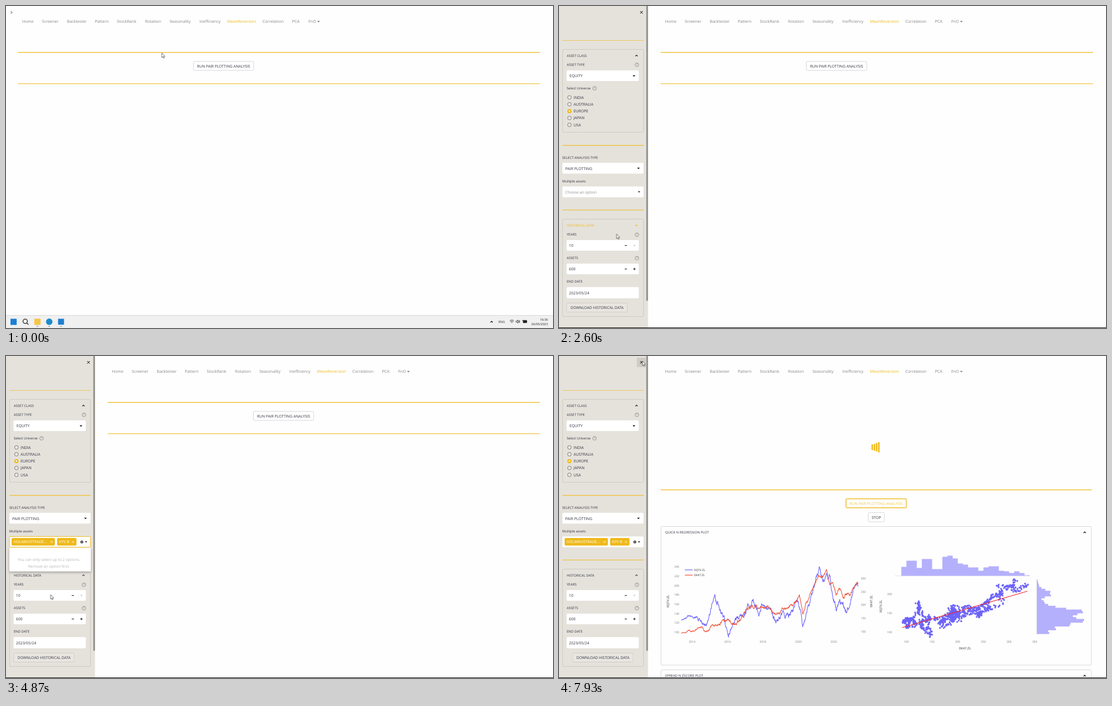
These frames come from a looping animation (974x575 px, 8000 ms). An HTML page:

```html
<!DOCTYPE html>
<html lang="en">
<head>
<meta charset="utf-8">
<title>Pair plotting</title>
<style>
html, body { margin: 0; width: 100%; height: 100%; overflow: hidden; background: #fefefe; }
svg { display: block; width: 100%; height: 100%; --gold: #eeb91b; --ink: #31333f; }
text { font-family: "Open Sans", "Noto Sans", sans-serif; font-size: 6.8px; fill: var(--ink);
  dominant-baseline: central; text-rendering: geometricPrecision; white-space: pre; }
.mid { text-anchor: middle; }
.end { text-anchor: end; }
.label { font-size: 6px; }
.nav text { font-size: 7.15px; fill: #858585; }
.nav .here, .gold { fill: var(--gold); }
.rule { fill: #efc02f; }
.tick text { font-size: 5.1px; fill: #777; }
.axis { font-size: 5.8px; font-weight: 600; fill: #666; }
.tray text { font-size: 5.6px; fill: #222; }
.field { fill: #fff; }
.box { fill: none; stroke: #cdcac4; }
.panel { fill: none; stroke: #d8d8db; }
.pen { fill: none; stroke: currentColor; }
.white { fill: #fff; }

.k, .glide { animation: 8s step-end infinite; }
.glide { animation-timing-function: ease-in-out; }
@keyframes closed { 0% { visibility: visible } 16.625%, to { visibility: hidden } }
@keyframes opener { 0% { visibility: hidden } 12.5% { visibility: visible } 16.625%, to { visibility: hidden } }
@keyframes shift { 0% { transform: translateX(0) } 16.625%, to { transform: translateX(160px) } }
@keyframes rule1 {
  0% { x: 21px; width: 930px; y: 82.2px }
  16.625% { x: 181px; width: 770px; y: 82.2px }
  88.375%, to { x: 181px; width: 767.5px; y: 238.3px }
}
@keyframes rule2 {
  0% { x: 21px; width: 930px; visibility: visible }
  16.625% { x: 181px; width: 770px; visibility: visible }
  88.375%, to { x: 181px; width: 770px; visibility: hidden }
}
@keyframes runPos {
  0% { transform: translate(387.5px, 107px) }
  16.625% { transform: translate(494.2px, 107px) }
  88.375%, to { transform: translate(564.7px, 263px) }
}
@keyframes runBox {
  0% { stroke: #d6d6d9; fill: #fff; stroke-width: 1px }
  81.875% { stroke: #eeb91b; fill: #fff; stroke-width: 1px }
  84.2% { stroke: #f2cd5e; fill: #eeb91b; stroke-width: 2px }
  86.7%, to { stroke: #f2cd5e; fill: #fff; stroke-width: 2px }
}
@keyframes runText {
  0% { fill: #31333f }
  81.875% { fill: #eeb91b }
  84.2% { fill: #fff }
  86.7%, to { fill: #f0c648 }
}
@keyframes stale {
  0%, 55%, 58.4%, 65%, 68.3%, to { opacity: 1 }
  57.5%, 67.5% { opacity: .85 }
}
@keyframes taskbar {
  0%, 1.6% { transform: translateY(0) }
  4.4%, to { transform: translateY(24px) }
}
@keyframes side {
  0%, 16.5% { transform: translateX(-158.5px); animation-timing-function: ease }
  20.25%, to { transform: translateX(0) }
}
@keyframes header {
  0% { color: #31333f } 31.2% { color: #eeb91b } 33% { color: #31333f }
  35.5% { color: #eeb91b } 36.4%, to { color: #31333f }
}
@keyframes focus { 0% { stroke: #0000 } 40% { stroke: #eeb91b } 74.125%, to { stroke: #0000 } }
@keyframes empty { 0% { visibility: visible } 49.125%, to { visibility: hidden } }
@keyframes one { 0% { visibility: hidden } 49.125%, to { visibility: visible } }
@keyframes two { 0% { visibility: hidden } 59.875%, to { visibility: visible } }
@keyframes listA { 0% { visibility: hidden } 41.625% { visibility: visible } 49.125%, to { visibility: hidden } }
@keyframes listB { 0% { visibility: hidden } 49.125% { visibility: visible } 59.875%, to { visibility: hidden } }
@keyframes list { 0% { visibility: hidden } 41.625% { visibility: visible } 59.875%, to { visibility: hidden } }
@keyframes full { 0% { visibility: hidden } 59.875% { visibility: visible } 74.125%, to { visibility: hidden } }
@keyframes row {
  0% { transform: translateY(0) } 45% { transform: translateY(19px) }
  47% { transform: translateY(38px) } 51% { transform: translateY(57px) }
  52.4%, to { transform: translateY(76px) }
}
@keyframes load { 0% { transform: translateX(0) } 88.375%, to { transform: translateX(10.5px) } }
@keyframes busy { 0% { visibility: hidden } 88.375%, to { visibility: visible } }
@keyframes plot { 0% { visibility: hidden } 91.625%, to { visibility: visible } }
@keyframes next { 0% { visibility: hidden } 95%, to { visibility: visible } }
@keyframes closer { 0% { visibility: hidden } 97.125%, to { visibility: visible } }
@keyframes hand {
  0% { visibility: hidden } 41.625% { visibility: visible } 60.5% { visibility: hidden }
  81.875% { visibility: visible } 88%, to { visibility: hidden }
}
@keyframes arrow {
  0% { visibility: visible } 41.625% { visibility: hidden } 60.5% { visibility: visible }
  81.875% { visibility: hidden } 88%, to { visibility: visible }
}
@keyframes move {
  0%, .875% { transform: translate(277.5px, 84px) }
  10.875% { transform: translate(20px, 14px) }
  13.125%, 16.625% { transform: translate(10px, 9px); animation-timing-function: linear }
  18.375% { transform: translate(81.5px, 43px); animation-timing-function: ease-out }
  20.875%, 22.5% { transform: translate(73px, 155px) }
  28.375%, 30.875% { transform: translate(104px, 283px) }
  32.5% { transform: translate(102.5px, 407px); animation-timing-function: ease-out }
  34.125% { transform: translate(98px, 423px) }
  38.375%, 41.625% { transform: translate(88px, 335px) }
  45% { transform: translate(82px, 372px) }
  48.4%, 49.4% { transform: translate(80px, 390px) }
  53.375%, 60% { transform: translate(78.5px, 428px) }
  70% { transform: translate(132.5px, 309.5px) }
  70.875%, 73.375% { transform: translate(133.3px, 312px) }
  82.5% { transform: translate(484px, 117px) }
  85%, 87.5% { transform: translate(486.5px, 112px); animation-timing-function: ease-in }
  94.125% { transform: translate(230px, 40px); animation-timing-function: ease-out }
  97.5% { transform: translate(150px, 9px) }
  99%, to { transform: translate(148.5px, 9px) }
}
.bars rect { transform-box: fill-box; transform-origin: center; animation: pulse .5s linear infinite alternate; }
@keyframes pulse { from { transform: scaleY(.5) } to { transform: scaleY(1) } }
</style>
</head>
<body>
<svg viewBox="0 0 974 575">
<defs>
  <path id="up" class="pen" d="M-2 1L0-1L2 1" stroke-width="1.1"/>
  <path id="caret" d="M-2.4-1.2H2.4L0 1.3Z"/>
  <path id="cross" class="pen" d="M-2.3-2.3L2.3 2.3M2.3-2.3L-2.3 2.3" stroke-width="1"/>
  <g id="help"><circle r="3.3" fill="none" stroke="#777" stroke-width=".7"/><text class="mid" y=".1" style="font-size:4.8px;fill:#666">?</text></g>
  <path id="minus" d="M-2 0H2" stroke-width="1.1" stroke="#222"/>
  <clipPath id="menuClip"><rect x="6" y="341.5" width="145" height="143"/></clipPath>
  <filter id="shadow" x="-10%" y="-10%" width="120%" height="130%"><feDropShadow dx="0" dy="2" stdDeviation="2" flood-opacity=".3"/></filter>
</defs>
<rect width="974" height="575" fill="#fefefe"/>

<g class="k" style="animation-name:closed">
  <rect class="k" style="animation-name:opener" x="2" y="3" width="16" height="17" rx="2" fill="#e4e4e6"/>
  <path d="M8.6 9.2L10.8 11.4L8.6 13.6" fill="none" stroke="#222" stroke-width="1"/>
</g>
<g id="nav" class="nav k" style="animation-name:shift"></g>

<g class="glide" style="animation-name:stale">
  <rect class="rule k" style="animation-name:rule1" height="1.4"/>
  <rect class="rule k" style="animation-name:rule2" y="138.2" height="1.1"/>
  <g class="k" style="animation-name:runPos">
    <rect class="k" style="animation-name:runBox" x="-53.7" y="-8" width="107.4" height="16" rx="2"/>
    <text class="mid k" style="animation-name:runText;font-size:6.7px">RUN PAIR PLOTTING ANALYSIS</text>
  </g>
</g>

<g class="k" style="animation-name:busy">
  <g class="bars gold">
    <rect x="556.5" y="154" width="2.6" height="18" style="animation-delay:-1020ms"/>
    <rect x="560.4" y="154" width="2.6" height="18" style="animation-delay:-900ms"/>
    <rect x="564.3" y="154" width="2.6" height="18" style="animation-delay:-710ms"/>
    <rect x="568.2" y="154" width="2.6" height="18" style="animation-delay:-570ms"/>
  </g>
  <rect class="panel" x="550.5" y="279.5" width="29" height="16.5" rx="2"/>
  <text class="mid" x="565" y="288">STOP</text>
</g>

<g class="k" style="animation-name:plot">
  <rect class="panel" x="181.5" y="304.5" width="766.5" height="247.5" rx="2"/>
  <text class="label" x="189" y="315">QUICK N REGRESSION PLOT</text>
  <use href="#up" x="936" y="315"/>
  <g id="ticks" class="tick"></g>
  <path id="lineA" fill="none" stroke="#6c63fa" stroke-width="1.1" stroke-linejoin="round"/>
  <path id="lineB" fill="none" stroke="#f0553b" stroke-width="1.1" stroke-linejoin="round"/>
  <path d="M224 382H238" stroke="#6c63fa" stroke-width="1.2"/>
  <path d="M224 391.3H238" stroke="#f0553b" stroke-width="1.2"/>
  <text class="axis" style="font-size:5.2px" x="240.5" y="382">0QTV.ZL</text>
  <text class="axis" style="font-size:5.2px" x="240.5" y="391.3">0K47.ZL</text>
  <text class="axis mid" transform="translate(194 438) rotate(-90)">0QTV.ZL</text>
  <text class="axis mid" transform="translate(556 438) rotate(-90)">0K47.ZL</text>
  <text class="axis mid" transform="translate(573 447) rotate(-90)">0QTV.ZL</text>
  <text class="axis mid" x="723" y="522">0K47.ZL</text>
  <path d="M598 392.7H838M850.5 399V498" stroke="#dcdce2" stroke-width=".8"/>
  <path id="hists" fill="#b5b0fc"/>
  <path id="dots" stroke="#6c63fa" stroke-width="3.2" stroke-linecap="round"/>
  <path d="M611 485L834 420" stroke="#f5222d" stroke-width="1.2"/>
</g>
<g class="k" style="animation-name:next">
  <rect class="panel" x="181.5" y="560.5" width="766.5" height="60" rx="2"/>
  <text class="label" x="189" y="571">SPREAD N ZSCORE PLOT</text>
  <use href="#up" x="936" y="571"/>
</g>

<g class="glide" style="animation-name:side">
  <rect width="158.5" height="575" fill="#e5e2dc"/>
  <rect x="155.5" width="2.8" height="526.5" rx="1" fill="#8d8b87"/>
  <rect class="k" style="animation-name:closer" x="138.5" y="3" width="17" height="17" rx="2" fill="#cfccc6"/>
  <use href="#cross" x="146.8" y="11.3"/>
  <rect class="rule" x="6" y="61" width="145" height="1" opacity=".75"/>
  <rect class="rule" x="6" y="248.3" width="145" height="1.3"/>
  <rect class="rule" x="6" y="363.7" width="145" height="1.1"/>

  <rect class="box" x="6.3" y="77.5" width="144.2" height="148" rx="2"/>
  <text class="label" x="13.7" y="88.5">ASSET CLASS</text><use href="#up" x="138" y="88.7"/>
  <text class="label" x="13.7" y="105">ASSET TYPE</text><use href="#help" x="138.7" y="105"/>
  <rect class="field" x="13.5" y="115" width="128.7" height="19" rx="2"/>
  <text x="18.7" y="124.7">EQUITY</text><use href="#caret" x="133.5" y="125"/>
  <text class="label" x="13.7" y="147">Select Universe</text><use href="#help" x="63.3" y="147"/>
  <g id="radios"></g>

  <text class="label" x="5.8" y="270.7">SELECT ANALYSIS TYPE</text>
  <rect class="field" x="6" y="280" width="144.5" height="19.3" rx="2"/>
  <text x="11" y="290">PAIR PLOTTING</text><use href="#caret" x="141.5" y="290"/>
  <text class="label" x="5.8" y="312.7">Multiple assets</text>
  <rect class="field k" style="animation-name:focus" x="6" y="322.3" width="144.5" height="19.2" rx="2"/>
  <use href="#caret" transform="translate(142.6 332) scale(.85)"/>
  <text class="k" style="animation-name:empty;fill:#8e8f95" x="11" y="332">Choose an option</text>
  <g class="k" style="animation-name:one">
    <rect class="gold" x="10" y="325" width="77" height="13.5" rx="2"/>
    <text class="white" style="font-size:6.7px;fill:#fff" x="13.6" y="331.8">HOLMKVISTRADE...</text>
    <use href="#cross" transform="translate(81.3 332) scale(.75)" color="#fff"/>
    <circle cx="135" cy="332" r="2.6" fill="#444"/>
    <use href="#cross" transform="translate(135 332) scale(.45)" color="#fff"/>
  </g>
  <g class="k" style="animation-name:two">
    <rect class="gold" x="91" y="325" width="34.5" height="13.5" rx="2"/>
    <text class="white" x="94.5" y="331.8">KYV B</text>
    <use href="#cross" transform="translate(119.3 332) scale(.75)" color="#fff"/>
  </g>

  <rect class="box" x="6.3" y="380.5" width="144.2" height="174" rx="2"/>
  <g class="k" style="animation-name:header">
    <text class="label" style="fill:currentColor" x="13.7" y="391.7">HISTORICAL DATA</text><use href="#up" x="138" y="391.7"/>
  </g>
  <text class="label" x="13.7" y="408.4">YEARS</text><use href="#help" x="138.7" y="408.4"/>
  <rect class="field" x="13.5" y="418" width="128.7" height="19" rx="2"/>
  <text x="17.8" y="427.7">10</text><use href="#minus" x="119" y="427.7"/>
  <path d="M132.3 427.7H136.3M134.3 425.7V429.7" stroke="#ccc" stroke-width=".9"/>
  <text class="label" x="13.7" y="450.3">ASSETS</text><use href="#help" x="138.7" y="450.3"/>
  <rect class="field" x="13.5" y="460" width="128.7" height="19" rx="2"/>
  <text x="17.8" y="469.6">600</text><use href="#minus" x="119" y="469.6"/>
  <path d="M132.3 469.6H136.3M134.3 467.6V471.6" stroke="#222" stroke-width="1.1"/>
  <text class="label" x="13.7" y="492.3">END DATE</text>
  <rect class="field" x="13.5" y="502" width="128.7" height="20" rx="2"/>
  <text x="17.8" y="512.3">2023/05/24</text>
  <g class="glide" style="animation-name:stale">
    <g class="k" style="animation-name:load">
      <rect x="13.5" y="530.5" width="108" height="16" rx="2" fill="#e9e6e1" stroke="#d0cdc7"/>
      <text class="mid" x="67.7" y="538.5" style="font-size:6.62px">DOWNLOAD HISTORICAL DATA</text>
    </g>
  </g>

  <g class="k" style="animation-name:list">
    <rect x="6" y="341.5" width="145" height="143" fill="#fff" filter="url(#shadow)"/>
    <g clip-path="url(#menuClip)">
      <rect class="k" style="animation-name:listB" x="6" y="379.5" width="142" height="19" fill="#eee"/>
      <rect class="k" style="animation-name:row" x="6" y="341.5" width="142" height="19" fill="#eee"/>
      <g id="listA" class="k" style="animation-name:listA"></g>
      <g id="listB" class="k" style="animation-name:listB"></g>
      <rect x="147.7" y="341.5" width="2.6" height="7.5" fill="#8f8f8f"/>
    </g>
  </g>
  <g class="k" style="animation-name:full">
    <rect x="6" y="342" width="145" height="42.5" fill="#fff" filter="url(#shadow)"/>
    <text class="mid" x="76.5" y="363" style="fill:#b3b5bb">You can only select up to 2 options.</text>
    <text class="mid" x="76.5" y="375.2" style="fill:#b3b5bb">Remove an option first.</text>
  </g>
</g>

<rect y="574" width="974" height="1" fill="#1c1c1c"/>
<g class="tray glide" style="animation-name:taskbar">
  <rect y="552" width="974" height="24" fill="#f0f0f0"/>
  <rect y="552" width="974" height=".8" fill="#d2d2d2"/>
  <rect x="8" y="558.5" width="11" height="11" fill="#1a80d6"/>
  <g fill="none" stroke="#222" stroke-width="1.3"><circle cx="34.2" cy="563" r="3.9"/><path d="M37 566L40 569"/></g>
  <rect x="50.5" y="558.5" width="11" height="11" fill="#f5c443"/>
  <circle cx="77" cy="563.8" r="5.8" fill="#1c8cc9"/>
  <rect x="92.7" y="558.5" width="10.6" height="10.6" fill="#1f7fcf"/>
  <path d="M54.5 572H57.5M75.5 572H78.5M96.5 572H99.5" stroke="#777" stroke-width="1.2"/>
  <use href="#up" x="864.7" y="564"/>
  <text class="mid" x="882.7" y="563.8">ENG</text>
  <g fill="none" stroke="#222" stroke-width=".8">
    <path d="M897 562.3Q900.7 559 904.4 562.3M898.2 563.8Q900.7 561.6 903.2 563.8M899.5 565.3Q900.7 564.2 901.9 565.3"/>
    <path d="M908.2 562.3H909.6L911.5 560.7V566.3L909.6 564.7H908.2ZM912.8 562Q914 563.5 912.8 565M914 561Q915.7 563.5 914 566"/>
    <rect x="921" y="561.3" width="6" height="4.4" fill="#222"/><path d="M927.6 562.5V564.5M920 560.5V563"/>
  </g>
  <text class="end" x="965" y="559.8">16:36</text>
  <text class="end" x="965" y="567.5">26/05/2023</text>
</g>

<g class="glide" style="animation-name:move">
  <path class="k" style="animation-name:arrow" d="M0 0V8.1L1.9 6.4L3.1 9.2L4.4 8.6L3.2 6H5.7Z" fill="#fff" stroke="#333" stroke-width=".7"/>
  <path class="k" style="animation-name:hand" d="M-.8 .5Q0-.6 .8 .5V3.4L3.6 4Q4.8 4.4 4.7 5.6L4 10H-.6L-3 6.8Q-3.2 5.6-2 5.8L-.8 6.8Z" fill="#fff" stroke="#222" stroke-width=".8" stroke-linejoin="round"/>
</g>
</svg>
<script>
(() => {
const $ = id => document.getElementById(id);
const add = (parent, tag, attrs, text = '') => {
  const el = document.createElementNS('http://www.w3.org/2000/svg', tag);
  for (const k in attrs) el.setAttribute(k, attrs[k]);
  el.textContent = text;
  return $(parent).appendChild(el);
};

const menu = { Home: 28.7, Screener: 64, Backtester: 108.5, Pattern: 158.2, StockRank: 197.5, Rotation: 247.8,
  Seasonality: 291.2, Inefficiency: 344.5, MeanReversion: 393.8, Correlation: 456.8, PCA: 509.4, FnO: 538.4 };
for (const name in menu)
  add('nav', 'text', { x: menu[name], y: 28, class: name == 'MeanReversion' ? 'here' : '' }, name);
add('nav', 'path', { d: 'M554 26.8H559L556.5 29.3Z', fill: '#777' });

['INDIA', 'AUSTRALIA', 'EUROPE', 'JAPAN', 'USA'].forEach((name, i) => {
  const y = 163.2 + i * 12.25, on = i == 2;
  add('radios', 'circle', { cx: 18.6, cy: y, r: on ? 2.6 : 3.3, fill: on ? '#fff' : '#e9e6e1',
    stroke: on ? '#eeb91b' : '#666', 'stroke-width': on ? 2.4 : .8 });
  add('radios', 'text', { x: 26, y }, name);
});

const stocks = ["TVELO 'B'", 'PALUNITAR B', 'HOLMKVISTRADEN A', 'HALVETOR AB', "OMVU 'B'", 'KYV B',
  'OLVEKA B', 'MODVELK B', 'MALDO TRESKER'];
const fill = (id, names) => names.forEach((name, i) => add(id, 'text', { x: 13.2, y: 351 + i * 19 }, name));
fill('listA', stocks);
fill('listB', stocks.filter((_, i) => i != 2));

// Axis labels
const ticks = (n, from, step, place) => {
  for (let i = 0; i < n; i++) add('ticks', 'text', place(i), from + i * step);
};
ticks(8, 100, 20, i => ({ x: 214, y: 494 - i * 16.7, class: 'end' }));
ticks(5, 2014, 2, i => ({ x: 237 + i * 63.1, y: 510.5, class: 'mid' }));
ticks(5, 100, 50, i => ({ x: 537.5, y: 492.5 - i * 23.6 }));
ticks(6, 100, 50, i => ({ x: 618.5 + i * 45.7, y: 510.5, class: 'mid' }));
ticks(3, 100, 50, i => ({ x: 593, y: 493.5 - i * 33.6, class: 'end' }));

// Price series: coarse shape every 6 px plus seeded noise
let seed = 7;
const rnd = () => (seed = (seed * 16807) % 2147483647) / 2147483647 - .5;
const series = (shape, amp) => {
  let drift = 0;
  return Array.from({ length: 1050 }, (_, i) => {
    const k = i / 20, j = Math.floor(k), a = shape[j], b = shape[j + 1] ?? a;
    drift = drift * .9 + rnd() * amp * Math.min(1, .3 + i / 300);
    return a + (b - a) * (k - j) + drift;
  });
};
const first = series([472, 468, 463, 466, 466, 469, 476, 482, 468, 442, 428, 450, 462, 478, 493, 478, 472, 466,
  462, 456, 448, 441, 450, 456, 440, 448, 456, 460, 472, 465, 458, 464, 463, 453, 437, 446, 486, 455, 438, 424,
  400, 383, 400, 394, 396, 432, 456, 436, 446, 458, 440, 418, 408], 5);
const second = series([495, 493, 491, 491, 490, 486, 484, 491, 488, 482, 480, 478, 474, 473, 470, 481, 477, 471,
  466, 458, 452, 448, 446, 453, 448, 446, 450, 456, 459, 458, 450, 447, 447, 444, 436, 426, 460, 442, 430, 415,
  398, 390, 394, 383, 408, 405, 425, 418, 433, 425, 430, 414, 403], 3);
const trace = ys => 'M' + ys.map((y, i) => `${(218 + i * .3).toFixed(1)} ${y.toFixed(1)}`).join('L');
$('lineA').setAttribute('d', trace(first));
$('lineB').setAttribute('d', trace(second));

// Each day's pair of prices becomes one dot
$('dots').setAttribute('d', first.map((y, i) => {
  const px = 618.5 + (492.5 - second[i]) * 1.936 + rnd() * 5;
  const py = 493.5 - (494 - y) * .805 + rnd() * 5;
  return `M${Math.max(612, px).toFixed(1)} ${py.toFixed(1)}h0`;
}).join(''));

const above = [16, 27, 27, 14, 30, 30, 12, 12, 34, 36, 31, 22, 20, 15, 15, 9, 15, 17, 17, 9, 8, 5, 8, 5, 1];
const beside = [1, 2, 3, 4, 8, 15, 24, 23, 25, 14, 8, 12, 14, 20, 33, 52, 80, 82, 72, 64, 70, 84, 82, 60, 58, 32, 34, 20, 22];
$('hists').setAttribute('d',
  above.map((h, i) => `M${609.5 + i * 9.14} 392.5v${-h}h9.2v${h}z`).join('') +
  beside.map((w, i) => `M851 ${399 + i * 3.36}h${w}v3.4h${-w}z`).join(''));
})();
</script>
</body>
</html>
```
